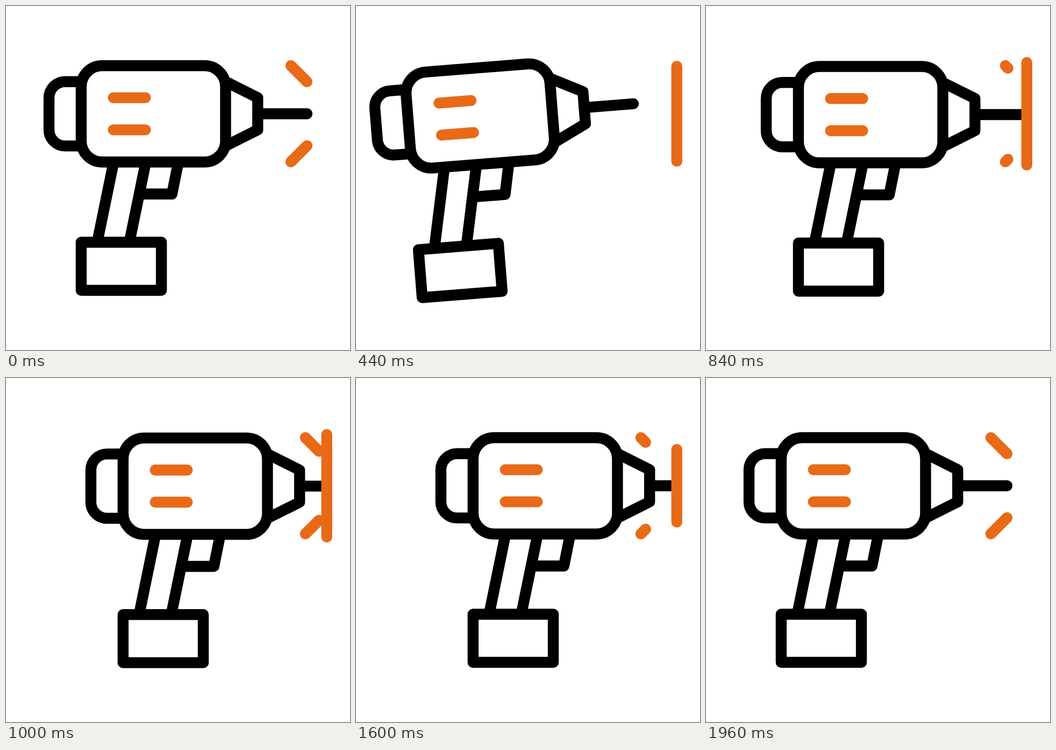
These frames come from a looping animation (640x640 px, 2000 ms). An HTML page:

```html
<!DOCTYPE html>
<html lang="en">
<head>
<meta charset="utf-8">
<title>Drill</title>
<style>
  html, body { margin: 0; width: 100%; height: 100%; overflow: hidden; background: #fff; }
  svg { display: block; width: 100%; height: 100%; }
  path, rect { fill: none; stroke: #000; stroke-width: 20.4; stroke-linejoin: round; }
  .accent { stroke: #e86a17; stroke-linecap: round; }
  .round { stroke-linecap: round; }
</style>
</head>
<body>
<svg viewBox="0 0 640 640">
  <clipPath id="front"><rect x="-50" y="-50" width="647" height="740"/></clipPath>
  <g id="sparks">
    <path class="accent" id="upper"/>
    <path class="accent" id="lower"/>
  </g>
  <g clip-path="url(#front)">
    <g id="drill">
      <path d="M140 140.7H110a30 30 0 0 0-30 30V230.4a30 30 0 0 0 30 30H140"/>
      <path class="round" d="M468.3 200.5H560"/>
      <path d="M408.5 140.7L468.3 170.6V230.4L408.5 260.3"/>
      <path d="M200.4 290L169.7 439.5M260.2 290L229.5 439.5M320.8 290L308.8 349.8H248"/>
      <rect x="139.9" y="111" width="268.6" height="179.2" rx="39"/>
      <rect x="139.9" y="439.5" width="149.2" height="89.5"/>
      <path class="accent" d="M199.7 170.6H259.4M199.7 230.4H259.4"/>
    </g>
  </g>
  <path class="accent" id="wall"/>
</svg>
<script>
const STEP = 40, STEPS = 50, MID = 200.5;
const [sparks, upper, lower, drill, wall] =
  ['sparks', 'upper', 'lower', 'drill', 'wall'].map(id => document.getElementById(id));

// Tables of [step, value], eased in and out between neighbours.
const SLIDE = [[1, 0], [8, -49.5], [16, 0], [30, 110], [35, 110], [49, 0]];
const TILT = [[1, 0], [9, -7], [14, 0]];
const SWING = [[1, 0], [8, -10]];
const SPARK = [[1, 1], [8, 0], [20, 0], [24, 1], [28, 0], [35, 0], [49, 1]];
const WALL = [[1, 0], [13, 1], [35, 1], [49, 0]];

function at(table, step) {
  const next = table.findIndex(key => key[0] > step);
  if (next < 0) return table[table.length - 1][1];
  if (next === 0) return table[0][1];
  const [s0, v0] = table[next - 1], [s1, v1] = table[next];
  const u = (step - s0) / (s1 - s0);
  return v0 + (v1 - v0) * u * u * (3 - 2 * u);
}

function line(el, amount, d) {
  el.setAttribute('visibility', amount > 0.001 ? 'visible' : 'hidden');
  el.setAttribute('d', d);
}

function draw(step) {
  const shaking = step >= 14 && step <= 30;
  const shake = shaking ? 1.7 * Math.sin((step - 14) * Math.PI * -0.375 + Math.PI) * -1 : 0;
  drill.setAttribute('transform',
    `translate(${at(SLIDE, step)} ${-shake}) rotate(${at(TILT, step)} 320 320)`);

  const swing = step <= 8 ? at(SWING, step) : 0;
  const shift = step > 8 && step < 35 ? 27 : 0;
  sparks.setAttribute('transform', `translate(${shift} 0) rotate(${swing} 320 320)`);
  const spark = at(SPARK, step), reach = 30 * spark;
  line(upper, spark, `M530 111l${reach} ${reach}`);
  line(lower, spark, `M530 290l${reach} ${-reach}`);

  const grown = at(WALL, step), half = 95.3 * grown;
  line(wall, grown, `M596.8 ${MID - half}V${MID + half}`);
}

const start = performance.now();
function tick() {
  draw(Math.floor((performance.now() - start) / STEP) % STEPS);
  requestAnimationFrame(tick);
}
tick();
</script>
</body>
</html>
```
